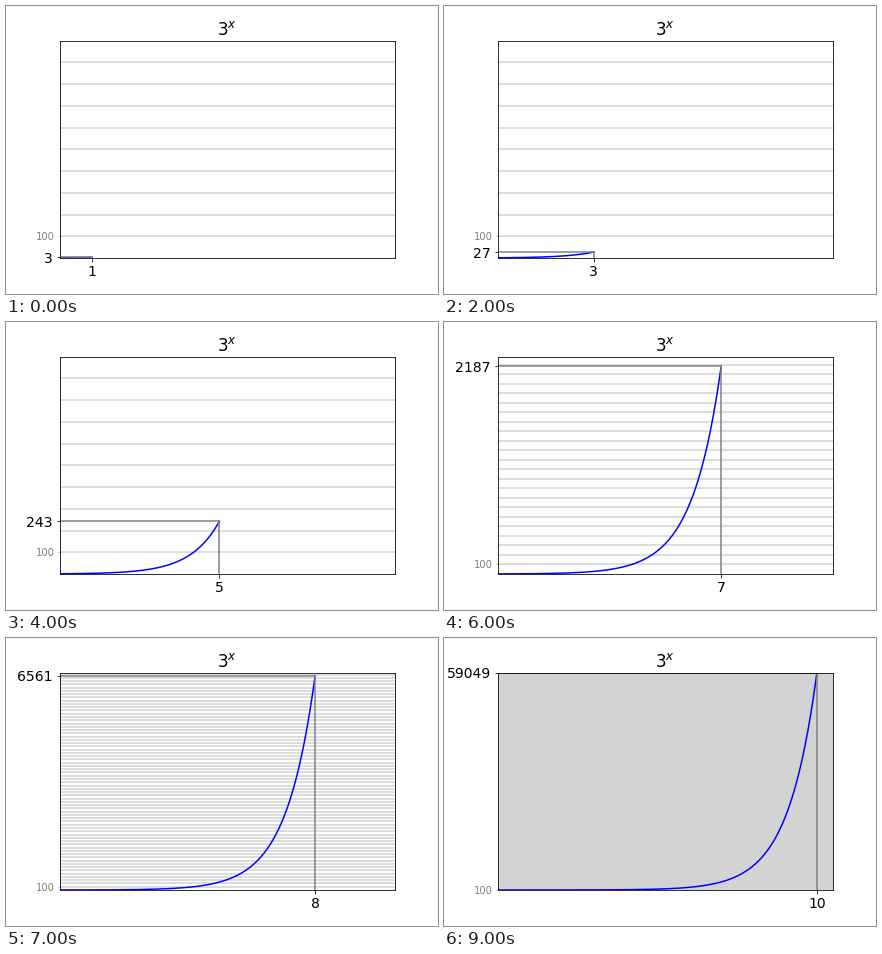
These frames come from a looping animation (432x288 px, 10 s). A matplotlib script:

```python
import numpy as np
import matplotlib.pyplot as plt
from matplotlib.animation import FuncAnimation
from matplotlib.ticker import FixedFormatter, FixedLocator

BASE, STEPS = 3, 10
plt.rcParams.update({"font.size": 14, "font.family": "DejaVu Sans"})

fig, ax = plt.subplots(figsize=(6, 4), dpi=72)
fig.subplots_adjust(left=0.125, right=0.9, bottom=0.125, top=0.88)


def draw(step):
    x = step + 1
    y = BASE ** x
    top = max(1000, y + 100)

    ax.clear()
    ax.set_title(f"${BASE}^x$")
    ax.set_xlim(0, STEPS + 0.5)
    ax.set_ylim(0, top)

    for level in range(100, top, 100):
        ax.axhline(level, color="lightgray", lw=1.5)

    xs = np.linspace(0, x, 50 * x + 1)
    ax.plot(xs, BASE ** xs, color="blue", lw=1.5)
    ax.plot([0, x], [y, y], color="gray", lw=1.5)
    ax.plot([x, x], [0, y], color="gray", lw=1.5)

    ax.set_xticks([x], [str(x)])
    ax.set_yticks([y], [str(y)])
    ax.yaxis.set_minor_locator(FixedLocator([100]))
    ax.yaxis.set_minor_formatter(FixedFormatter(["100"]))
    ax.tick_params(axis="y", which="minor", labelsize=10, colors="gray")
    return []


anim = FuncAnimation(fig, draw, frames=STEPS, init_func=lambda: [],
                     interval=1000, repeat=True, repeat_delay=0)
plt.show()
```
